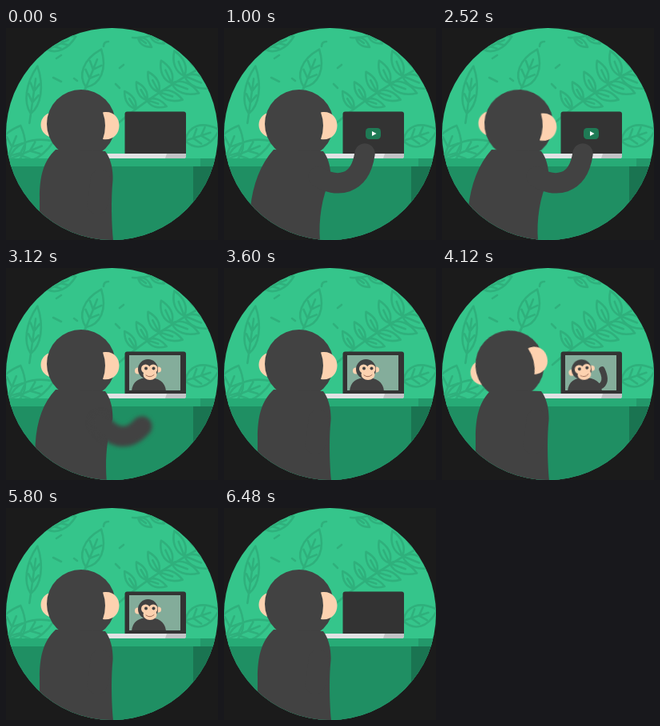
An HTML page without scripts for the animation above (6.72 s loop, 265 px wide and 265 px high).

```html
<!DOCTYPE html>
<html lang="en">
<head>
<meta charset="utf-8">
<title>Video call</title>
<style>
html, body { margin: 0; width: 100%; height: 100%; overflow: hidden; background: #1b1b1b; }
svg { display: block; width: 100vw; height: 100vh; }

.fur { fill: #424242; }
.skin { fill: #fdd2b0; }
.plants { fill: none; stroke: #2fb07c; stroke-width: 2.6; stroke-linecap: round; stroke-linejoin: round; }
.plants use { vector-effect: non-scaling-stroke; }
#leaf path, #blade { vector-effect: non-scaling-stroke; }
.limb { fill: none; stroke: #424242; stroke-linecap: round; }

.head, .body, .arm, .play, .call, .friend, .wave { animation: 6.72s ease-in-out infinite; }
.head { animation-name: head; transform-origin: 94px 158px; }
.body { animation-name: body; animation-timing-function: ease; }
.arm { animation-name: arm; stroke-width: 25.5; }
.play { animation-name: play; }
.call { animation-name: call; }
.friend { animation-name: friend; transform-origin: 178px 146px; }
.wave { animation-name: wave; stroke-width: 7.5; }

@keyframes head {
  0%, 23.81%, 43.4%, 54.17%, 83.93%, 100% { transform: rotate(0deg); }
  28% { transform: rotate(-6deg); }
  33.33% { transform: rotate(1deg); }
  37.5% { transform: rotate(3deg); }
  60%, 65% { transform: rotate(-14deg); }
  73.81% { transform: rotate(-2deg); }
}
@keyframes body {
  0%, 9.52%, 53.57%, 100% { d: path("M41 266C42 255 42 235 42 212C42 185 47 166 62 152L124 154C131 163 134 177 133.5 190C131 215 132 245 134 266Z"); }
  14.88%, 44.05% { d: path("M31 266C32 255 32 240 33 225C36 195 46 170 62 152L124 154C131 163 134 177 133 188C122 212 118 240 120 266Z"); }
}
@keyframes arm {
  0%, 9.52%, 51%, 100% { d: path("M118 190C118 200 116 210 114 220"); filter: blur(0); }
  11.9% { d: path("M118 190C135 212 155 212 169 197"); filter: blur(2px); }
  13.5% { d: path("M118 186C140 202 174 198 182 158"); filter: blur(.6px); }
  14.88%, 23.81%, 30.5%, 38.5% { d: path("M118 186C140 200 170 198 176 157"); filter: blur(0); }
  26.8% { d: path("M118 186C140 199 180 190 188 136"); filter: blur(0); }
  39.9% { d: path("M118 186C140 199 180 190 187 134"); filter: blur(0); }
  41.3% { d: path("M118 186C145 202 190 190 212 110"); filter: blur(1.5px); }
  42.7% { d: path("M118 186C140 200 174 190 186 116"); filter: blur(1.5px); }
  44.05% { d: path("M118 186C145 202 190 190 212 110"); filter: blur(1.5px); animation-timing-function: ease-in; }
  46.43% { d: path("M118 193C135 215 154 216 170 198"); filter: blur(2.6px); animation-timing-function: ease-out; }
}
@keyframes play {
  0%, .4% { opacity: 0; }
  2.38%, 39.87% { opacity: 1; }
  39.88%, 100% { opacity: 0; }
}
@keyframes call {
  0%, 39.87% { opacity: 0; }
  39.88%, 86.3% { opacity: 1; }
  96.43%, 100% { opacity: 0; }
}
@keyframes friend {
  0%, 54.17%, 83.93%, 100% { transform: rotate(0deg); }
  59%, 65% { transform: rotate(-9deg); }
  73.81% { transform: rotate(-2deg); }
}
@keyframes wave {
  0%, 55%, 72.6%, 100% { d: path("M188 156C191 160 194 164 196 166"); }
  58.3% { d: path("M188 148C200 153 210 146 207 127"); }
  61.31% { d: path("M188 146C199 152 208 144 200 127"); }
  65.8% { d: path("M188 148C202 153 212 145 213 127"); }
  68.5% { d: path("M188 146C199 152 208 144 200 127"); }
}
</style>
</head>
<body>
<svg viewBox="0 0 265 265" aria-label="An ape answers a video call">
  <defs>
    <clipPath id="disc"><circle cx="132.5" cy="132.5" r="132.5"/></clipPath>
    <clipPath id="screen"><path d="M154 109H218V153H154Z"/></clipPath>
    <!-- both leaves grow upward from 0,0 -->
    <g id="leaf">
      <path d="M0 0C-14-12-15-36 0-60C15-36 14-12 0 0ZM0 12V-44M0-14L-8-24M0-14L8-24M0-28L-7-38M0-28L7-38"/>
    </g>
    <path id="blade" d="M0 0C-7-7-6-17 0-26C6-17 7-7 0 0M0 0V-15"/>
  </defs>

  <g clip-path="url(#disc)">
    <path fill="#35c58b" d="M0 0H265V265H0Z"/>

    <g class="plants">
      <use href="#leaf" transform="translate(31 107) rotate(8) scale(.8 1)"/>
      <use href="#leaf" transform="translate(100 74) rotate(22) scale(1.1 .85)"/>
      <path d="M100 74Q95 82 96 91M122 23Q122 17 128 17"/>
      <use href="#leaf" transform="translate(52 27) rotate(65) scale(.7 .65)"/>
      <use href="#leaf" transform="translate(-2 172) rotate(22) scale(1.5 .9)"/>
      <use href="#leaf" transform="translate(4 164) rotate(68) scale(1.1 1)"/>
      <use href="#leaf" transform="translate(224 141) rotate(72) scale(1.2 .75)"/>

      <!-- fern -->
      <path d="M138 121Q185 80 265 38"/>
      <use href="#blade" transform="translate(162 101) rotate(-32)"/>
      <use href="#blade" transform="translate(176 90) rotate(-30)"/>
      <use href="#blade" transform="translate(191 80) rotate(-28) scale(1.1)"/>
      <use href="#blade" transform="translate(207 69) rotate(-25) scale(1.2)"/>
      <use href="#blade" transform="translate(223 60) rotate(-22) scale(1.3)"/>
      <use href="#blade" transform="translate(240 51) rotate(-20) scale(1.4)"/>
      <use href="#blade" transform="translate(176 90) rotate(108)"/>
      <use href="#blade" transform="translate(191 80) rotate(108) scale(1.2)"/>
      <use href="#blade" transform="translate(207 69) rotate(110) scale(1.4)"/>
      <use href="#blade" transform="translate(223 60) rotate(112) scale(1.5)"/>
      <use href="#blade" transform="translate(240 51) rotate(114) scale(1.6)"/>

      <path d="M158 12Q182 14 204-2"/>
      <use href="#blade" transform="translate(165 12) rotate(125) scale(.8)"/>
      <use href="#blade" transform="translate(180 9) rotate(120) scale(.8)"/>
      <path d="M59 62L69 67M85 63L89 66M137 70L142 75M142 50L147 46M63 38L69 34"/>
    </g>

    <path fill="#27ab76" d="M0 163H265V173H0Z"/>
    <path fill="#23986a" d="M243 163H265V173H243Z"/>
    <path fill="#1f8f63" d="M0 173H265V265H0Z"/>
    <path fill="#1a7451" d="M234 173H265V265H234Z"/>

    <g>
      <rect x="148.5" y="104.5" width="76.5" height="56" rx="3" fill="#333"/>
      <path fill="#e2e2e4" d="M123 157H225V160Q225 163 222 163H127Q123 163 123 159Z"/>
      <path fill="#c3c3c6" d="M201 157H225V160Q225 163 222 163H199Z"/>
      <g class="play">
        <rect x="177" y="125" width="19" height="14" rx="4.5" fill="#1f7a55"/>
        <path fill="#fff" d="M185 129L190.5 132L185 135Z"/>
      </g>
      <g class="call" clip-path="url(#screen)">
        <path fill="#84ad9b" d="M154 109H218V153H154Z"/>
        <path class="limb wave" d="M188 156C191 160 194 164 196 166"/>
        <path class="fur" d="M157 154C158 142 166 137 178 137S199 142 200 154Z"/>
        <g class="friend">
          <g class="skin"><circle cx="165" cy="128.5" r="4"/><circle cx="190.5" cy="127" r="3.5"/></g>
          <circle class="fur" cx="177.5" cy="126.5" r="12.5"/>
          <g class="skin">
            <circle cx="174.5" cy="126" r="5.5"/><circle cx="184" cy="126" r="5.5"/>
            <ellipse cx="180" cy="133" rx="8.5" ry="7"/>
          </g>
          <g class="fur"><circle cx="175" cy="125.5" r="2"/><circle cx="184.5" cy="125.5" r="2"/></g>
          <path d="M175 134Q180 138 185 133.5" fill="none" stroke="#a0705a" stroke-linecap="round"/>
        </g>
      </g>
    </g>

    <g class="head">
      <circle class="skin" cx="59" cy="121" r="15.5"/>
      <circle class="fur" cx="94" cy="120" r="43"/>
      <path class="skin" d="M121 105.500C134 103 141.500 112 141.500 122S134 141 121 139Q127 122 121 105.500Z"/>
    </g>
    <path class="fur body" d="M41 266C42 255 42 235 42 212C42 185 47 166 62 152L124 154C131 163 134 177 133.5 190C131 215 132 245 134 266Z"/>
    <path class="limb arm" d="M118 190C118 200 116 210 114 220"/>
  </g>
</svg>
</body>
</html>
```
